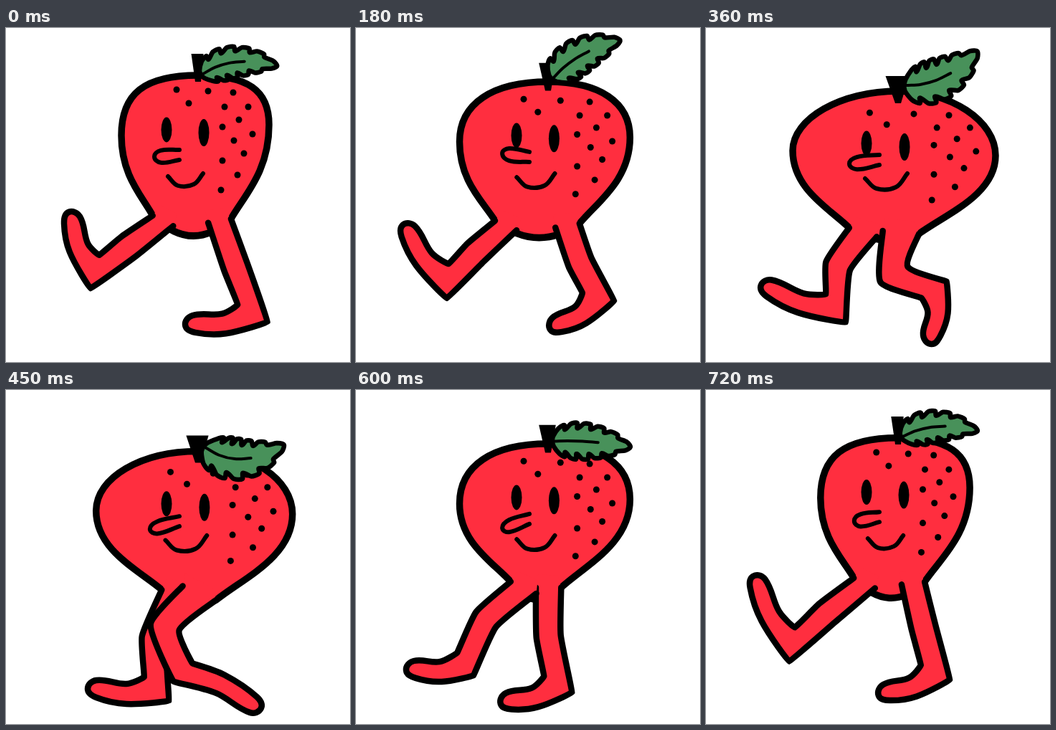
An HTML page that plays this animation: 480 by 466 pixels, repeating every 0.78 s.

```html
<!DOCTYPE html>
<html lang="en">
<head>
<meta charset="utf-8">
<title>Walking strawberry</title>
<style>
  html, body { margin: 0; width: 100%; height: 100%; overflow: hidden; background: #fff; }
  svg { display: block; width: 100vw; height: 100vh; }
  .red { fill: #ff2e3f; }
  .line { fill: none; stroke: #000; stroke-linecap: round; stroke-linejoin: round; }
  .nose { fill: #ff2e3f; stroke: #000; stroke-width: 6; stroke-linecap: round; stroke-linejoin: round; }
  .leaf { fill: #48915a; stroke: #000; stroke-width: 6.5; stroke-linejoin: round; }
</style>
</head>
<body>
<svg id="stage" viewBox="0 0 480 466" xmlns="http://www.w3.org/2000/svg"></svg>
<script>
const LOOP = 780;
const STEPS = [0, 60, 90, 150, 180, 210, 240, 270, 330, 360, 420, 450, 510, 540, 600, 630, 690, 720];
const COUNT = STEPS.length;

// One leg through its full cycle of two loops: step, hip x, ankle x y, toe x y.
const WALK = [
  [0, 219, 124, 340, 92, 268],
  [4, 209, 128, 353, 73, 284],
  [9, 219, 181, 391, 88, 363],
  [11, 237, 210, 417, 126, 417],
  [13, 260, 257, 424, 192, 434],
  [15, 276, 303, 396, 229, 431],
  [17, 289, 320, 394, 252, 422],
  [18, 298, 344, 398, 262, 413],
  [22, 295, 338, 375, 281, 414],
  [27, 272, 318, 365, 315, 429],
  [29, 270, 247, 394, 345, 439],
  [31, 250, 198, 398, 140, 437],
  [33, 220, 114, 365, 52, 335],
  [35, 221, 120, 355, 72, 270]
];
// Leaf sway: step, angle in degrees, upward camber.
const SWAY = [[0, -7, 25], [4, -30, 18], [9, -25, -26], [11, -1, -38], [13, 6.5, 2], [15, 0, 8], [17, -5, 22]];
const SEEDS = [[238, 86], [255, 105], [282, 88], [317, 90], [338, 110], [305, 110], [325, 128],
               [302, 138], [344, 148], [318, 157], [332, 175], [302, 185], [323, 205], [300, 226]];

// Cyclic cubic interpolation over rows that start with their step.
function sample(rows, period, x) {
  const n = rows.length;
  const row = i => {
    const [at, ...v] = rows[(i + n) % n];
    return { at: at + Math.floor(i / n) * period, v };
  };
  let i = n - 1;
  while (rows[i][0] > x) i--;
  const [a, b, c, d] = [-1, 0, 1, 2].map(k => row(i + k));
  const h = c.at - b.at, u = (x - b.at) / h, u2 = u * u, u3 = u2 * u;
  return b.v.map((p, j) => {
    const q = c.v[j];
    const m = (q - a.v[j]) / (c.at - a.at) * h;
    const k = (d.v[j] - p) / (d.at - b.at) * h;
    return (2 * u3 - 3 * u2 + 1) * p + (u3 - 2 * u2 + u) * m + (3 * u2 - 2 * u3) * q + (u3 - u2) * k;
  });
}

const move = (p, d, s = 1) => [p[0] + d[0] * s, p[1] + d[1] * s];
const mix = (p, q, u) => [p[0] + (q[0] - p[0]) * u, p[1] + (q[1] - p[1]) * u];
const unit = ([x, y]) => { const l = Math.hypot(x, y) || 1; return [x / l, y / l]; };
const dir = (p, q) => unit([q[0] - p[0], q[1] - p[1]]);
const front = ([x, y]) => [-y, x];
const fmt = p => p[0].toFixed(1) + ' ' + p[1].toFixed(1);
const cubic = (...pts) => 'C' + pts.map(fmt).join(' ');
const poly = pts => 'M' + pts.map(fmt).join('L') + 'Z';
const bump = (x, mid, width) => Math.exp(-(((x - mid) / width) ** 2));

// Open curve through points; round(i) sets how soft point i is, 0 being a corner.
function curve(pts, round = () => 0.36) {
  const n = pts.length;
  const handle = (i, len) => {
    const d = dir(pts[Math.max(0, i - 1)], pts[Math.min(n - 1, i + 1)]);
    return [d[0] * len * round(i), d[1] * len * round(i)];
  };
  let d = 'M' + fmt(pts[0]);
  for (let i = 0; i < n - 1; i++) {
    const p = pts[i], q = pts[i + 1], len = Math.hypot(q[0] - p[0], q[1] - p[1]);
    d += cubic(move(p, handle(i, len)), move(q, handle(i + 1, len), -1), q);
  }
  return d;
}

// Outline of a leg around its hip, knee, ankle and toe.
const LEG_ROUND = [0.1, 0.17, 0.04, 0.34, 0.37, 0.38, 0.37, 0.34, 0.02, 0.17, 0.1];
function legOutline(step, hipY) {
  const [hx, ax, ay, tx, ty] = sample(WALK, 2 * COUNT, step);
  const bend = 18 * bump(step, 10, 4) + 40 * bump(step, 28, 4);
  const hip = [hx, hipY], ankle = [ax, ay], toe = [tx, ty];
  const knee = move(mix(hip, ankle, 0.5), front(dir(hip, ankle)), bend);
  const thigh = front(dir(hip, knee)), shin = front(dir(knee, ankle));
  const along = dir(ankle, toe), foot = front(along);
  const miter = (a, b) => {
    const m = unit([a[0] + b[0], a[1] + b[1]]);
    return [m, Math.min(24, 17 / (m[0] * a[0] + m[1] * a[1]))];
  };
  const ribs = [
    [hip, unit([thigh[0] - 1, thigh[1]]), 16 + bend / 4],
    [knee, ...miter(thigh, shin)],
    [ankle, ...miter(shin, foot)],
    [move(mix(ankle, toe, 0.5), foot, -7), foot, 14],
    [toe, foot, 12]
  ];
  const side = s => ribs.map(([p, n, w]) => move(p, n, w * s));
  return [...side(1), move(toe, along, 12), ...side(-1).reverse()];
}

// Body from its widest points, its top and the two hips; q is the squash from 0 to 1.
function bodyShape(q, hipL, hipR) {
  const top = [268, 66 + 22 * q];
  const left = [161 - 40 * q, 150 + 21 * q], right = [367 + 37 * q, 135 + 43 * q];
  const k = 0.7 - 0.16 * q;
  const shoulder = p => [[top[0] + (p[0] - top[0]) * k, top[1]], [p[0], p[1] + (top[1] - p[1]) * k]];
  const flank = (p, hip) => [
    [p[0], p[1] + (hip[1] - p[1]) * 0.5],
    [hip[0] + (p[0] - hip[0]) * 0.35, hip[1] + (p[1] - hip[1]) * 0.25]
  ];
  const mid = mix(hipL, hipR, 0.5), bottom = 290 + 6 * q;
  return 'M' + fmt(top) + cubic(...shoulder(right), right) + cubic(...flank(right, hipR), hipR) +
    'Q' + fmt([mid[0], 2 * bottom - mid[1]]) + ' ' + fmt(hipL) +
    cubic(...flank(left, hipL).reverse(), left) + cubic(...shoulder(left).reverse(), top) + 'Z';
}

function leafShape(q, deg, camber) {
  const a = deg * Math.PI / 180, axis = [Math.cos(a), Math.sin(a)], up = [axis[1], -axis[0]];
  const base = [272 + 4 * q, 66 + 14 * q], tip = move(base, axis, 107 + 6 * q);
  const ctrl = move(move(mix(base, tip, 0.5), axis, -8), up, camber);
  const half = 22 + 7 * q;
  const point = (u, off = 0) => {
    const p = mix(base, ctrl, u), r = mix(ctrl, tip, u);
    const w = half * Math.sin(Math.PI * Math.min(1, u) ** 0.72) ** 0.6;
    return move(mix(p, r, u), front(dir(p, r)), off * w);
  };
  const side = s => {
    const pts = [point(0.02, s * 0.8)];
    for (let k = 0; k < 5; k++) {
      const u = 0.17 + 0.165 * k;
      pts.push(point(u - 0.07, s), point(u + 0.01, s * 1.02), point(u + 0.015, s * 0.72));
    }
    return [...pts, point(0.95, s * 0.9)];
  };
  const edge = [base, ...side(-1), tip, ...side(1).reverse(), base];
  return {
    edge: curve(edge, i => i % (edge.length - 1) ? 0.22 : 0) + 'Z',
    vein: curve([0.03, 0.22, 0.42, 0.62].map(u => point(u)))
  };
}

const stage = document.getElementById('stage');
function add(tag, attrs) {
  const el = document.createElementNS(stage.namespaceURI, tag);
  for (const k in attrs) el.setAttribute(k, attrs[k]);
  return stage.appendChild(el);
}
const path = (cls, width = 0) => add('path', width ? { class: cls, 'stroke-width': width } : { class: cls });
const place = (el, x, y) => { el.setAttribute('cx', x.toFixed(1)); el.setAttribute('cy', y.toFixed(1)); };
const shape = (el, d) => el.setAttribute('d', d);

const body = path('red line', 9.5);
body.style.fill = '#ff2e3f';
const dots = SEEDS.map(() => add('circle', { r: 4.5 }));
const legs = [0, 1].map(() => ({ fill: path('red'), line: path('line', 8.5) }));
const eyes = [17.5, 19].map(ry => add('ellipse', { rx: 7.5, ry }));
const nose = path('nose'), mouth = path('line', 6);
const stem = path('stem'), leaf = path('leaf'), vein = path('line', 4);

function drawLeg(leg, pts) {
  const d = curve(pts, i => LEG_ROUND[i]);
  // Reach into the body so the fill hides its outline at the hip.
  const inward = p => move(p, dir(p, [262, 190]), 18);
  shape(leg.fill, d + 'L' + fmt(inward(pts[pts.length - 1])) + 'L' + fmt(inward(pts[0])) + 'Z');
  shape(leg.line, d);
}

function drawFace(step, q) {
  place(eyes[0], 224, 142 + 19 * q);
  place(eyes[1], 276 + q, 146 + 20 * q);
  const droop = 4 + 9 * Math.cos(2 * Math.PI * (step - 13) / COUNT);
  const root = [242, 177 + 7 * q], tip = [207 - 7 * q, root[1] + droop];
  const bridge = mix(root, tip, 0.75);
  shape(nose, curve([move(root, [0, -7]), move(bridge, [0, -8]), tip, move(bridge, [0, 9]), move(root, [0, 7])]));
  const low = 220 + 4 * q;
  shape(mouth, curve([[226 - 4 * q, 207 + 3 * q], [240 - 2 * q, low], [262 + 3 * q, low - 2], [275 + 6 * q, 203]]));
}

function draw(step) {
  const q = Math.sin(Math.PI * step / COUNT) ** 2;
  const outlines = [step, step + COUNT].map(s => legOutline(s, 269 + 16 * q));
  const hips = outlines.flatMap(pts => [pts[0], pts[pts.length - 1]]).sort((a, b) => a[0] - b[0]);
  shape(body, bodyShape(q, hips[0], hips[3]));
  outlines.forEach((pts, i) => drawLeg(legs[i], pts));

  SEEDS.forEach(([x, y], i) =>
    place(dots[i], 262 + (x - 262) * (1 + 0.4 * q), y + q * (14 + (226 - y) * 0.13)));
  drawFace(step, q);

  const stemTop = 36 + 31 * q, stemEnd = 75 + 30 * q, w = 8.5 + 8 * q;
  shape(stem, poly([[267 - w, stemTop], [267 + w, stemTop], [272, stemEnd], [264, stemEnd]]));
  const l = leafShape(q, ...sample(SWAY, COUNT, step));
  shape(leaf, l.edge);
  shape(vein, l.vein);
}

let shown = -1;
function tick() {
  const t = performance.now() % LOOP;
  let step = COUNT - 1;
  while (STEPS[step] > t) step--;
  if (step !== shown) draw(shown = step);
  requestAnimationFrame(tick);
}
tick();
</script>
</body>
</html>
```
